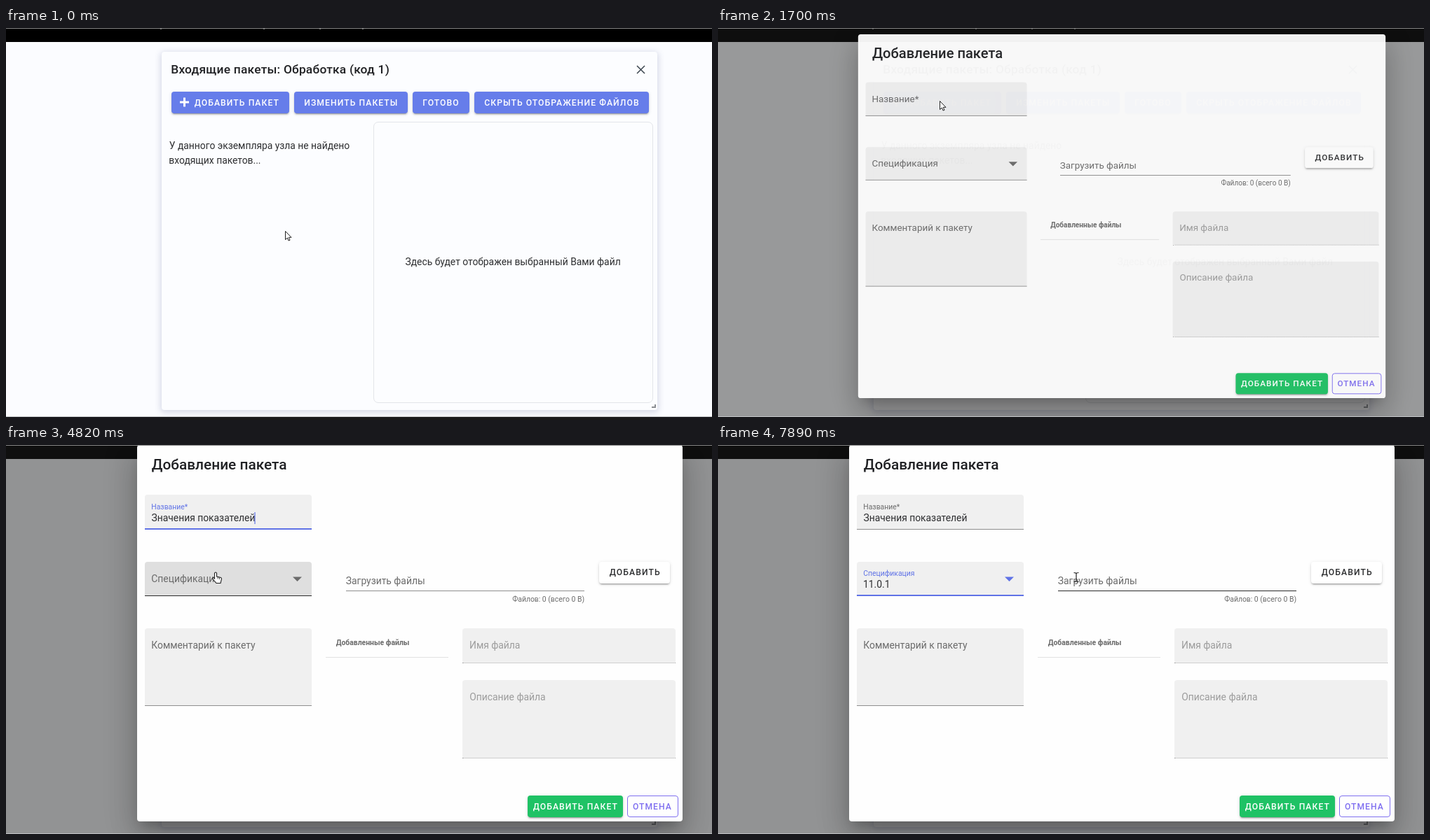
An HTML page for the animation above (8 s loop, 1007 by 556 pixels).

```html
<!DOCTYPE html>
<html lang="ru">
<head>
<meta charset="utf-8">
<style>
html, body { margin: 0; width: 100%; height: 100%; overflow: hidden; }
#stage { position: relative; width: 1007px; height: 556px; overflow: hidden; background: #fbfcff; }
#stage div, #stage svg { position: absolute; }
svg, .layer { left: 0; top: 0; width: 1007px; height: 556px; }
text { font-family: Roboto, sans-serif; white-space: pre; }
.card { box-shadow: 0 11px 15px -7px #0003, 0 24px 38px 3px #00000024, 0 9px 46px 8px #0000001f; }
.raised { box-shadow: 0 3px 1px -2px #0003, 0 2px 2px #00000024, 0 1px 5px #0000001f; }
.menu { box-shadow: 0 5px 5px -3px #0003, 0 8px 10px 1px #00000024, 0 3px 14px 2px #0000001f; }
</style>
</head>
<body>
<div id="stage"></div>
<script>
const LOOP = 8000, BLUE = '#667dea', ACCENT = '#5f72e6', DARK = '#2e2f31', GREY = '#6b6b6b', PALE = '#9c9c9c';
const BODY = 13.87, SMALL = 10.4;

const bursts = [[0, 0, 1], [290, 1320, 8], [1450, 1580, 2], [1700, 2160, 4], [2590, 2890, 3], [3170, 3320, 2],
  [3620, 3620, 1], [4210, 4820, 5], [5230, 6110, 7], [6400, 7310, 7], [7460, 7890, 4]];
const ticks = bursts.flatMap(([a, b, n]) =>
  Array.from({ length: n }, (_, i) => Math.round(a + (n > 1 ? (b - a) * i / (n - 1) : 0))));

const pointerPath = [[150, 398, 290], [1320, 316, 104], [1850, 316, 104], [2160, 313, 100], [4100, 313, 100],
  [4820, 299, 182], [5600, 299, 182], [6110, 281, 230], [6480, 281, 230], [7310, 466, 188], [7890, 511, 189]];

const smooth = p => p * p * (3 - 2 * p);
const ramp = (t, a, b) => smooth(Math.min(1, Math.max(0, (t - a) / (b - a))));
const within = (t, a, b) => t >= a && t < b;

function track(t, keys, ease = p => p) {
  const i = keys.findIndex(k => k[0] > t);
  if (i < 0) return keys[keys.length - 1].slice(1);
  if (!i) return keys[0].slice(1);
  const a = keys[i - 1], b = keys[i], p = ease((t - a[0]) / (b[0] - a[0]));
  return a.slice(1).map((v, j) => v + (b[j + 1] - v) * p);
}

const box = (x, y, w, h, css = '', cls = '', inner = '') =>
  `<div class="${cls}" style="left:${x}px;top:${y}px;width:${w}px;height:${h}px;${css}">${inner}</div>`;
const layer = (css, inner) => `<div class="layer" style="${css}">${inner}</div>`;
const svg = inner => `<svg viewBox="0 0 1007 556">${inner}</svg>`;
const text = (x, y, str, fill = DARK, size = BODY, extra = '') =>
  `<text x="${x}" y="${y}" fill="${fill}" font-size="${size}" ${extra}>${str}</text>`;
const caps = (x, y, str, fill) => text(x, y, str, fill, 12.14, 'font-weight="500" letter-spacing="1.084"');
const path = (d, fill, stroke = 'none', width = 1) =>
  `<path d="${d}" fill="${fill}" stroke="${stroke}" stroke-width="${width}"/>`;

function field(x, y, w, h, { hover = false, focus = 0, dotted = false } = {}) {
  const line = dotted ? 'border-top:1px dotted #a0a0a0' : `background:${hover ? '#2a2a2a' : '#8e8e8e'}`;
  return box(x, y, w, h, `background:${hover ? '#dfdfdf' : '#f0f0f0'};border-radius:4px 4px 0 0`) +
    box(x, y + h, w, dotted ? 0 : 1, line) +
    (focus ? box(x + w * (1 - focus) / 2, y + h - 1, w * focus, 2, `background:${ACCENT}`) : '');
}

const label = (y, float, str, fill) =>
  text(207.3, y - 8.8 * float, str, fill, BODY + (SMALL - BODY) * float);

function page(t) {
  const button = (x, w, inner = '') =>
    box(x, 91, w, 30.5, `background:${BLUE};border-radius:4px;overflow:hidden`, 'raised', inner);
  const r = 78 * ramp(t, 1380, 1580);
  const ripple = t < 1450 ? '' : box(0, 0, 168, 31, 'background:#ffffff26') +
    box(82 - r, 15 - r, 2 * r, 2 * r, 'background:#ffffff38;border-radius:50%');
  return box(0, 0, 1007, 20, 'background:#000') +
    [220, 367, 447, 508].map(x => box(x, 1, 2, 1, 'background:#777')).join('') +
    box(222, 34, 707, 512, 'background:#fcfdff;border-radius:4px;box-shadow:0 2px 8px 2px rgba(75,85,140,.2)') +
    button(236, 168, ripple) + button(411, 162) + button(580, 81) + button(668, 249) +
    box(524, 134, 397, 400, 'border:1px solid #e3e5e9;border-radius:7px') +
    svg(text(235.3, 64.7, 'Входящие пакеты: Обработка (код 1)', '#202124', 17.34,
        'font-weight="500" letter-spacing=".217"') +
      path('M900 54l11 11M911 54l-11 11', 'none', '#3c4650', 1.5) +
      path('M254.5 99.5v13M248 106h13', 'none', '#fff', 3) +
      caps(268.7, 110.5, 'ДОБАВИТЬ ПАКЕТ', '#fff') + caps(425.3, 110.5, 'ИЗМЕНИТЬ ПАКЕТЫ', '#fff') +
      caps(594.3, 110.5, 'ГОТОВО', '#fff') + caps(682.3, 110.5, 'СКРЫТЬ ОТОБРАЖЕНИЕ ФАЙЛОВ', '#fff') +
      text(232.8, 173, 'У данного экземпляра узла не найдено') + text(232.3, 193.8, 'входящих пакетов...') +
      text(569.5, 339.3, 'Здесь будет отображен выбранный Вами файл') +
      path('M926 538v4h-5', 'none', '#8a8d92', 2));
}

function dialog(t, [x, y]) {
  const nameOn = within(t, 2590, 5230), selectOn = t >= 5230;
  const nameFloat = ramp(t, 2500, 2850), selectFloat = ramp(t, 5140, 5490);
  const shown = t >= 3620;
  const arrow = selectOn ? ACCENT : GREY;
  return box(187, 0, 778, 538, 'background:#fefefe;border-radius:4px', 'card') +
    field(197.5, 71, 238.5, 49, { hover: within(t, 2000, 2590), focus: nameOn ? nameFloat : 0 }) +
    field(197.5, 167, 238.5, 48, { hover: !selectOn && t > 4210 && y > 167, focus: selectFloat }) +
    field(197.5, 262, 238.5, 110) +
    field(651, 262, 304, 48.5, { dotted: true }) + field(651, 336, 304, 110.5, { dotted: true }) +
    box(485, 208, 340, 1, `background:${x > 485 && t > 7000 ? '#2a2a2a' : '#8e8e8e'}`) +
    box(456, 303, 175, 1, 'background:#e2e2e2') +
    box(846, 167, 101, 31, 'background:#fff;border-radius:4px', 'raised') +
    box(744, 501, 135.5, 30.5, 'background:#1fc265;border-radius:4px', 'raised') +
    box(886, 501, 70.5, 28.5, 'border:1px solid #7f6ff0;border-radius:4px') +
    svg(text(207.8, 35.3, 'Добавление пакета', '#202124', 20.8, 'font-weight="500"') +
      label(100.5, nameFloat, 'Название*', nameOn ? ACCENT : GREY) +
      (shown ? text(207.5, 109, 'Значения показателей') : '') +
      (within(t, 2590, 3170) || within(t, 3620, 5230)
        ? path(`M${shown ? 355 : 208.5} 96v17`, 'none', ACCENT, 1.2) : '') +
      label(195.6, selectFloat, 'Спецификация', selectOn ? ACCENT : GREY) +
      (t >= 6400 ? text(207, 204, '11.0.1') : '') +
      path('M409 188.5h13l-6.5 6.5z', arrow) +
      label(290.8, 0, 'Комментарий к пакету', GREY) +
      text(484.8, 198.7, 'Загрузить файлы', GREY) +
      text(825, 223.8, 'Файлов: 0 (всего 0 В)', GREY, SMALL, 'text-anchor="end"') +
      text(470.7, 285.5, 'Добавленные файлы', GREY, SMALL, 'font-weight="700"') +
      text(661, 290.8, 'Имя файла', PALE) + text(661.3, 364.6, 'Описание файла', PALE) +
      caps(860.8, 186.3, 'ДОБАВИТЬ', DARK) + caps(751.7, 520.7, 'ДОБАВИТЬ ПАКЕТ', '#fff') +
      caps(894, 520.7, 'ОТМЕНА', '#7f6ff0'));
}

function menu(y) {
  const row = Math.floor((y - 174) / 41.5);
  return box(197.5, 166, 239, 264, 'background:#fff;border-radius:4px', 'menu') +
    box(197.5, 174 + 41.5 * row, 220, 41.5, 'background:#f3f3f3') +
    box(418, 167, 17.5, 263, 'background:#f1f1f1') + box(419, 186, 16, 107, 'background:#c1c1c1') +
    svg(path('M422.5 179.5h9l-4.5-5z', '#8a8a8a') + path('M422.5 417.5h9l-4.5 5z', '#404040') +
      ['1', '11.0.1', '11.0.2', '123', '1ч', 'fdsfsdf'].map((s, i) => text(210.5, 198.5 + 41.6 * i, s)).join(''));
}

function pointer(t, [x, y]) {
  if (within(t, 3320, 4210)) return '';
  const inName = t > 1900 && y < 121, inSelect = t > 4210 && x < 436 && y > 167;
  let shape;
  if (inName || x > 485) shape = path('M-3.5-6.5q3.5 0 3.5 1.5q0-1.5 3.5-1.5M0-5v11M-3.5 6.5q3.5 0 3.5-1.5q0 1.5 3.5 1.5', 'none', '#222', 1.2);
  else if (inSelect) shape = path('M-1.5 1q1.5-2 3 0v5l6 1.5q1 .5 1 2l-1.5 6h-6l-5.5-6.5q0-2 2-1l1 1z', '#fff', '#222', 1.1) +
    path('M3.2 6.5v3M5.5 7v3', 'none', '#222', .8);
  else shape = path('M.5.5v12l2.8-2.5l1.8 4l1.9-.8l-1.8-3.9h3.8z', '#fff', '#222');
  return svg(`<g transform="translate(${x} ${y})">${shape}</g>`);
}

function draw(t) {
  const at = track(t, pointerPath, smooth);
  const [scale, alpha, shade] = track(t, [[1450, .3, 0, 0], [1580, .589, .2, .14], [1700, .967, .95, .45], [1850, 1, 1, .48]]);
  const menuAlpha = ramp(t, 5300, 5650) * (1 - ramp(t, 6400, 6700));
  return page(t) +
    layer(`background:#212121;opacity:${shade}`, '') +
    (alpha ? layer(`transform-origin:576px 269px;transform:scale(${scale});opacity:${alpha}`, dialog(t, at)) : '') +
    (menuAlpha ? layer(`opacity:${menuAlpha}`, menu(Math.min(at[1], 236))) : '') +
    pointer(t, at) +
    box(0, 0, 1007, 1, 'background:#858585') + box(0, 555, 1007, 1, 'background:#bfc1c4');
}

const stage = document.getElementById('stage');
const start = performance.now();
let last = -1;
function frame() {
  const now = (performance.now() - start) % LOOP;
  const t = ticks.filter(k => k <= now).pop();
  if (t !== last) stage.innerHTML = draw(last = t);
  requestAnimationFrame(frame);
}
frame();
</script>
</body>
</html>
```
